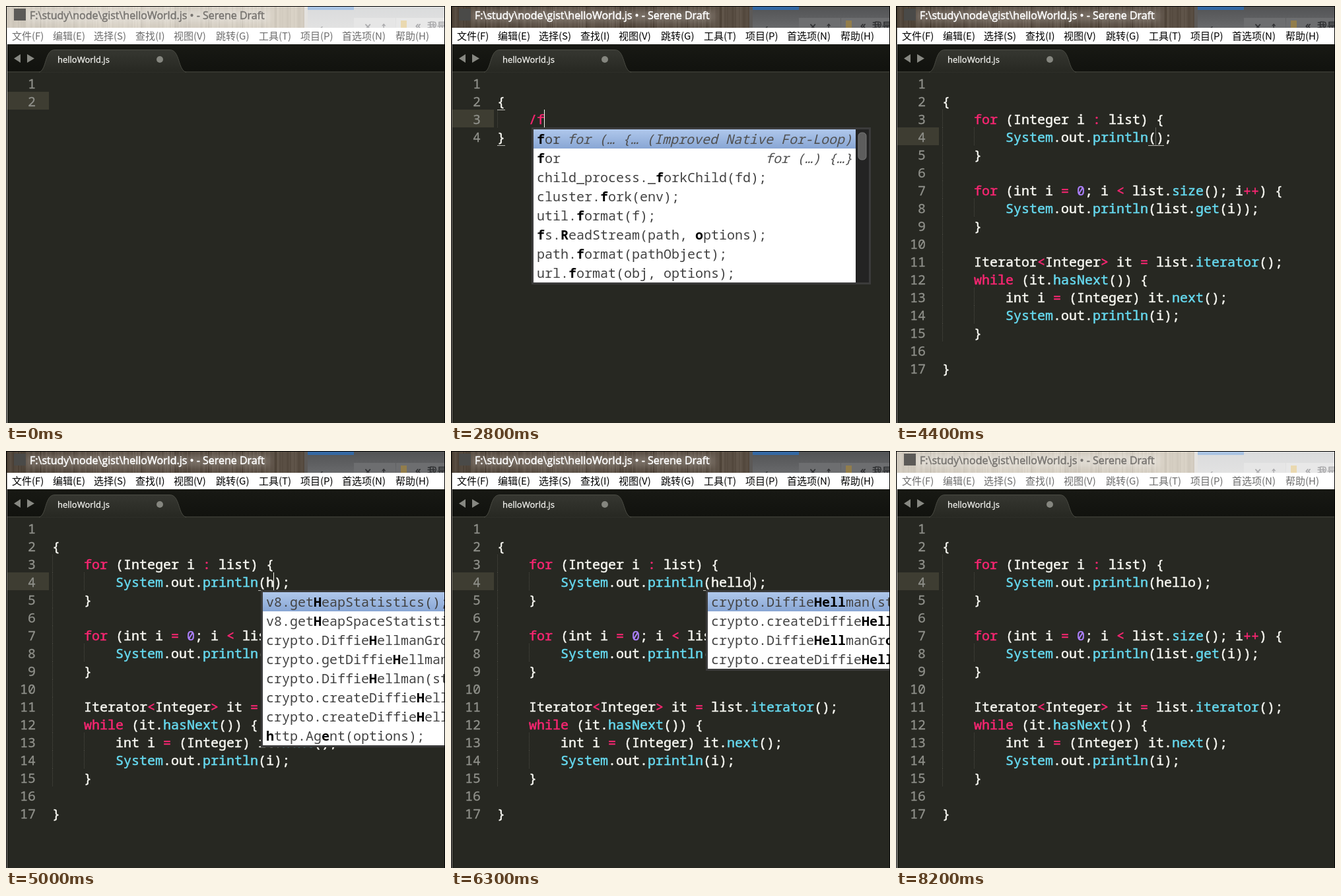
These frames come from a looping animation (665 px wide and 632 px high, 8300 ms). An HTML page with a canvas:

```html
<!DOCTYPE html>
<html lang="zh">
<head>
<meta charset="utf-8">
<title>Editor</title>
<style>
html, body { margin: 0; width: 100%; height: 100%; overflow: hidden; background: #272822; }
canvas { display: block; }
</style>
</head>
<body>
<canvas id="stage" width="665" height="632"></canvas>
<script>
const W = 665, H = 632, LOOP = 8300;
const LEFT = 70, TOP = 103, CHAR = 12, LINE = 27, ROW = 29;
const MONO = '20px "Noto Sans Mono", monospace';
const UI = '"Open Sans", "Noto Sans", sans-serif';
const CJK = '15px "Noto Sans CJK SC", "Noto Sans CJK", "Noto Sans", sans-serif';
const WHITE = '#f8f8f2', PINK = '#f92672', CYAN = '#66d9ef', PURPLE = '#ae81ff';
const ctx = document.getElementById('stage').getContext('2d');

// Asterisks mark the matched letters, a bar starts the right-hand hint.
const forItems = [
  '*for*|for (… {… (Improved Native For-Loop)', '*for*|for (…) {…}',
  'child_process._*for*kChild(fd);', 'cluster.*for*k(env);', 'util.*for*mat(f);',
  '*f*s.*R*eadStream(path, *o*ptions);', 'path.*for*mat(pathObject);', 'url.*for*mat(obj, options);'
];
const heItems = [
  'v8.get*He*apStatistics();', 'v8.get*He*apSpaceStatistics();',
  'crypto.Diffie*He*llmanGroup(name);', 'crypto.getDiffie*He*llman(name);',
  'crypto.Diffie*He*llman(string);', 'crypto.createDiffie*He*llman(prime);',
  'crypto.createDiffie*He*llman(length);', '*h*ttp.Ag*e*nt(options);'
];
const helloItems = [
  'crypto.Diffie*Hell*man(string);', 'crypto.createDiffie*Hell*man(prime);',
  'crypto.Diffie*Hell*manGr*o*up(name);', 'crypto.createDiffie*Hell*man(length);'
];
const forPopup = n => ({ x: 122, y: 184, w: 514, items: forItems, n, bar: true });
const argPopup = (items, n) => ({ x: 386, y: 211, w: 420, items, n });

const typed = s => `\n{\n    ${s}\n}`;
const loops = arg => `
{
    for (Integer i : list) {
        System.out.println(${arg});
    }

    for (int i = 0; i < list.size(); i++) {
        System.out.println(list.get(i));
    }

    Iterator<Integer> it = list.iterator();
    while (it.hasNext()) {
        int i = (Integer) it.next();
        System.out.println(i);
    }

}`;
const slash = s => ({ text: typed(s), col: 4 + s.length, caret: 1 });
const print = arg => ({
  text: loops(arg), row: 4, col: 27 + arg.length, caret: 1, pair: [[4, 26], [4, 27 + arg.length]]
});

// Each step changes only the listed parts of the state.
const steps = [
  [0, { active: false, text: '\n', row: 2, col: 0, caret: 0, pair: [], popup: null }],
  [400, { active: true, caret: 1 }],
  [700, { caret: .65 }], [800, { caret: .3 }], [900, { caret: 0 }],
  [1100, { text: '\n{', col: 1, caret: 1 }],
  [1200, { text: '\n{}', col: 2, pair: [[2, 0], [2, 1]] }],
  [1400, { col: 1 }],
  [1700, { text: '\n{\n\n}', row: 3, col: 4, pair: [[2, 0], [4, 0]] }],
  [2000, { caret: .65 }], [2100, { caret: .3 }], [2200, { caret: 0 }],
  [2500, slash('/')],
  [2700, slash('/f')], [2800, { popup: forPopup(1) }],
  [2900, slash('/fo')], [3000, { popup: forPopup(2) }],
  [3300, { ...slash('/for'), popup: forPopup(3) }],
  [3400, { ...print(''), pair: [], popup: null }], [3500, print('')],
  [3800, { caret: .4 }], [3900, { caret: 0 }],
  [4400, { caret: .3 }], [4500, { caret: 1 }],
  [4900, print('h')], [5000, { popup: argPopup(heItems, 1) }],
  [5300, { caret: .4 }], [5400, { caret: 0 }],
  [5800, { ...print('he'), popup: argPopup(heItems, 2) }],
  [6100, { ...print('hel'), popup: argPopup(helloItems, 3) }],
  [6200, { ...print('hell'), popup: argPopup(helloItems, 4) }],
  [6300, print('hello')],
  [6700, { caret: .65 }], [6800, { caret: .3 }], [6900, { caret: 0 }],
  [7300, { caret: .3 }], [7400, { caret: 1 }],
  [7700, { caret: .4 }], [7900, { caret: 0 }],
  [8200, { active: false, pair: [], popup: null }]
];

function stateAt(t) {
  const state = {};
  for (const [start, change] of steps) if (start <= t) Object.assign(state, change);
  return state;
}

function rect(x, y, w, h, fill) {
  ctx.fillStyle = fill;
  ctx.fillRect(x, y, w, h);
}
// A hairline in the text colour gives the heavier look of screen-hinted type.
function text(s, x, y, color, font = MONO, align = 'left', weight = .5) {
  ctx.font = font;
  ctx.textAlign = align;
  ctx.fillStyle = ctx.strokeStyle = color;
  ctx.lineWidth = weight;
  ctx.lineJoin = 'round';
  ctx.fillText(s, x, y);
  if (weight) ctx.strokeText(s, x, y);
}
function fade(y0, y1, a, b) {
  const g = ctx.createLinearGradient(0, y0, 0, y1);
  g.addColorStop(0, a);
  g.addColorStop(1, b);
  return g;
}
function shape(path, fill) {
  ctx.fillStyle = fill;
  ctx.fill(new Path2D(path));
}
const lineTop = row => TOP + (row - 1) * LINE;
const noise = n => Math.abs(Math.sin(n * 127.1 + 3) * 43758.5453) % 1;

function drawWood(active) {
  const base = active ? [88, 77, 66] : [212, 205, 193], spread = active ? 18 : 12;
  for (let x = 1; x < 452; x++) {
    const seam = x % 51 < 2 ? spread : 0;
    const d = (noise(x >> 1) + noise(Math.floor(x / 51)) - 1) * spread - seam;
    rect(x, 1, 1, 32, `rgb(${base.map(c => Math.round(c + d))})`);
  }
}

function drawTitle(active) {
  ctx.save();
  ctx.beginPath();
  ctx.rect(1, 1, 663, 32);
  ctx.clip();
  drawWood(active);
  rect(452, 1, 5, 32, active ? '#5c5957' : '#e4e2df');
  rect(457, 1, 207, 32, active ? fade(1, 33, '#525355', '#68696b') : fade(1, 33, '#dadbdc', '#e2e2e2'));
  rect(457, 1, 70, 5, active ? '#3468a4' : '#a9c3e3');
  rect(527, 18, 63, 15, active ? '#6d6e70' : '#e6e6e6');
  rect(591, 18, 73, 15, active ? '#6d6e70' : '#e8e8e8');
  rect(598, 22, 9, 11, active ? '#927d4b' : '#ead9b0');
  const ink = active ? '#2f3032' : '#a9a9ab';
  text('←', 472, 37, ink, `20px ${UI}`);
  text('×', 543, 38, ink, `18px ${UI}`);
  text('↑', 567, 38, ink, `20px ${UI}`);
  text('«', 620, 35, ink, `17px ${UI}`);
  text('我是', 638, 36, ink, CJK);

  ctx.filter = 'blur(6px)';
  rect(32, 7, 366, 17, active ? 'rgba(200,192,185,.35)' : 'rgba(255,255,255,.35)');
  ctx.filter = 'none';
  text('F:\\study\\node\\gist\\helloWorld.js • - Serene Draft', 36, 20,
    active ? '#fff' : '#777470', `16px ${UI}`);
  ctx.restore();
  rect(12, 4, 18, 18, active ? '#4a4a48' : '#5c5a57');
}

function drawMenu(active) {
  rect(2, 33, 662, 25, '#fff');
  const names = ['文件(F)', '编辑(E)', '选择(S)', '查找(I)', '视图(V)', '跳转(G)', '工具(T)', '项目(P)', '首选项(N)', '帮助(H)'];
  const xs = [9, 71, 133, 196, 254, 318, 383, 446, 509, 590];
  names.forEach((s, i) => text(s, xs[i], 51, active ? '#000' : '#6d6d6d', CJK, 'left', 0));
}

function drawTabs() {
  rect(2, 58, 662, 43, fade(58, 101, '#181914', '#11120e'));
  rect(2, 99, 662, 2, '#34352e');
  const edge = 'M50 100.5C62 97 58 66.5 74 66.5H248C264 66.5 260 97 273 100.5';
  shape(edge, fade(66, 101, '#363731', '#272822'));
  ctx.strokeStyle = '#4a4b43';
  ctx.lineWidth = 1;
  ctx.stroke(new Path2D(edge));
  shape('M12 79.5L22 73V86Z M43 79.5L32 73V86Z', '#878882');
  text('helloWorld.js', 78, 86, '#f4f4f0', `13px ${UI}`, 'left', .3);
  shape('M228 81a5 5 0 1 0 10 0a5 5 0 1 0 -10 0', '#85867f');
}

const token = /(\/\w*|\b(?:for|while)\b|[:=<>]|\+\+)|(\b(?:System|println|size|get|iterator|hasNext|next)\b)|(\b\d+\b)/g;

function drawLine(s, y) {
  const put = (part, at, color) => text(part, LEFT + at * CHAR, y, color);
  let end = 0;
  for (const m of s.matchAll(token)) {
    put(s.slice(end, m.index), end, WHITE);
    put(m[0], m.index, m[1] ? PINK : m[2] ? CYAN : PURPLE);
    end = m.index + m[0].length;
  }
  put(s.slice(end), end, WHITE);
}

function drawCode({ text: source, row, col, caret, pair }) {
  const lines = source.split('\n');
  const indent = s => s === undefined ? 0 : s.search(/\S|$/) / 4;
  rect(2, lineTop(row), 63, LINE, '#3e3d32');
  lines.forEach((s, i) => {
    const y = lineTop(i + 1);
    const depth = s ? indent(s) : Math.min(indent(lines[i - 1]), indent(lines[i + 1]));
    for (let k = 0; k < depth; k++)
      for (let d = 0; d < LINE; d += 2) rect(LEFT + k * 4 * CHAR, y + d, 1, 1, '#4b4b43');
    text(i + 1, 45, y + 22, '#8f908a', MONO, 'right', .3);
    drawLine(s, y + 22);
  });
  for (const [r, c] of pair)
    rect(LEFT + c * CHAR, lineTop(r + 1), CHAR, 1, 'rgba(248,248,242,.7)');
  rect(LEFT + col * CHAR - 1, lineTop(row), 1, LINE, `rgba(248,248,240,${caret})`);
}

function drawPopup({ x, y, w, items, n, bar }) {
  const h = items.length * ROW, inner = w - 6 - (bar ? 20 : 0);
  rect(x, y, w, h + 6, '#3b3b3b');
  rect(x + 3, y + 3, inner, h, '#fff');
  rect(x + 3, y + 3, inner, ROW, fade(y + 3, y + 3 + ROW, '#b0c8ec', '#88a6d4'));
  if (bar) {
    rect(x + 3 + inner, y + 3, 20, h, '#232323');
    ctx.beginPath();
    ctx.roundRect(x + 495, y + 8, 12, 41, 5);
    ctx.fillStyle = '#5d5d5d';
    ctx.fill();
    ctx.strokeStyle = '#777';
    ctx.lineWidth = 1;
    ctx.stroke();
  }
  items.forEach((item, i) => {
    const base = y + 3 + i * ROW + 22;
    const [label, hint] = item.split('|');
    let at = x + 8;
    const put = (s, bold) => {
      text(s, at, base, bold ? '#000' : '#424242', (bold ? 'bold ' : '') + MONO, 'left', 0);
      at += s.length * CHAR;
    };
    label.split('*').forEach((s, k) => {
      const cut = k % 2 ? n : 0;
      put(s.slice(0, cut), true);
      put(s.slice(cut), false);
    });
    if (hint) text(hint, x + 3 + inner - 5, base, '#505050', 'italic ' + MONO, 'right', 0);
  });
}

function draw() {
  const state = stateAt(performance.now() % LOOP);
  rect(0, 0, W, H, '#272822');
  drawTitle(state.active);
  drawMenu(state.active);
  drawTabs();
  drawCode(state);
  if (state.popup) drawPopup(state.popup);
  rect(1, 33, 1, H - 33, state.active ? '#85817d' : '#cfccc8');
  rect(0, 0, W, 1, '#000');
  rect(0, 0, 1, H, '#000');
  rect(W - 1, 0, 1, H, '#000');
  requestAnimationFrame(draw);
}
draw();
</script>
</body>
</html>
```
